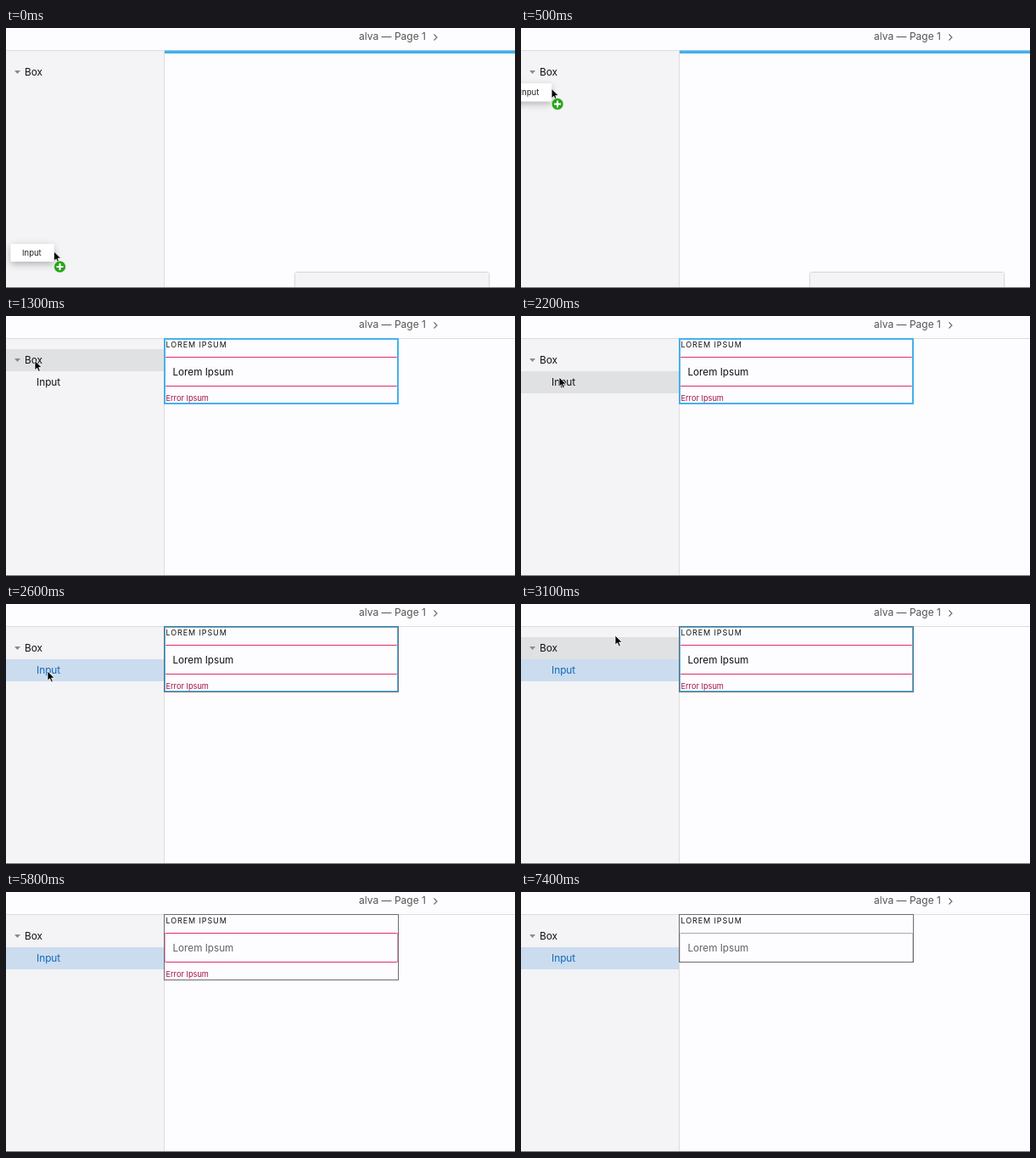
Recreate the animation shown at these times as an HTML page. Size 600x306 px, loop 8 s.

```html
<!DOCTYPE html>
<html lang="en">
<head>
<meta charset="utf-8">
<title>Page editor</title>
<style>
  html, body { margin: 0; width: 100%; height: 100%; overflow: hidden; background: #fdfcfe; }
  svg { display: block; width: 100%; height: 100%; }
  text { font-family: Inter, Roboto, sans-serif; }
  .row { font-size: 11.8px; }
</style>
</head>
<body>
<svg viewBox="0 0 600 306">
  <defs>
    <filter id="soft" x="-50%" y="-100%" width="200%" height="300%">
      <feDropShadow dx="0" dy="3" stdDeviation="4" flood-opacity=".28"/>
    </filter>
    <filter id="edge" x="-10%" y="-30%" width="120%" height="160%">
      <feDropShadow dx="0" dy="0" stdDeviation="1.2" flood-opacity=".4"/>
    </filter>
  </defs>

  <rect width="600" height="306" fill="#fdfcfe"/>
  <rect y="26" width="186" height="280" fill="#f4f3f6"/>
  <path d="M0 26.5H600M186.5 27V306" stroke="#dddcdf"/>
  <text x="416" y="14.2" font-size="12" fill="#555">alva — Page 1</text>
  <path d="M504.5 7.5l3.5 3.5-3.5 3.5" fill="none" stroke="#666" stroke-width="1.1"/>

  <rect id="hover" width="186" height="26" fill="#dfe1e3"/>
  <rect id="picked" y="65" width="186" height="26" fill="#cbdcef"/>
  <path d="M10 50h7l-3.5 4z" fill="#8a8a8c"/>
  <text class="row" x="22" y="56" fill="#111">Box</text>
  <text class="row" id="child" x="36" y="82">Input</text>

  <rect id="bar" x="187" y="26.5" width="413" height="3.5" fill="#42b0ea"/>
  <rect id="panel" x="341" y="288" width="228" height="30" rx="1" fill="#f4f3f5" filter="url(#edge)"/>

  <g id="field">
    <text x="188.5" y="37.3" font-size="9" letter-spacing=".9" fill="#111">LOREM IPSUM</text>
    <text id="value" x="196.5" y="70.2" font-size="11.7">Lorem Ipsum</text>
    <rect id="input" x="187" y="48.5" width="275" height="34" rx="1.5" fill="none"/>
    <text id="error" x="188.5" y="100.2" font-size="9.2" fill="#a3104a">Error Ipsum</text>
    <rect id="glow" x="187" y="27" width="275" height="76" fill="none" stroke="#46b1ec" stroke-width="2"/>
    <rect id="frame" x="186.5" y="26.5" width="276" fill="none" stroke="#6d6d70"/>
  </g>

  <g id="ghost">
    <rect x="-51" y="-10.5" width="51" height="21" rx="2" fill="#fff" filter="url(#soft)"/>
    <text x="-37.5" y="3.4" font-size="9.5" fill="#222">Input</text>
  </g>
  <g id="cursor">
    <path d="M0 0V11.2L2.6 8.8 4.4 12.8 6.3 12 4.6 8.1H8.2Z" fill="#000" stroke="#fff" stroke-width=".8"/>
    <g id="badge" transform="translate(7 18)">
      <circle r="7" fill="#2aa31c" stroke="#e8f3e6" stroke-width=".8"/>
      <path d="M-4 0H4M0-4V4" stroke="#fff" stroke-width="2"/>
    </g>
  </g>

  <path d="M0 305.5H600" stroke="#777"/>
</svg>
<script>
const LOOP = 8000, STEP = 100;
const el = Object.fromEntries([...document.querySelectorAll('svg [id]')].map(e => [e.id, e]));
const show = (e, on) => e.setAttribute('display', on ? 'inline' : 'none');
const place = (e, x, y) => e.setAttribute('transform', `translate(${x.toFixed(2)} ${y.toFixed(2)})`);
const set = (e, key, v) => e.setAttribute(key, v);
const mix = (a, b, k) => a + (b - a) * k;
const out = (t, start, length) => 1 - (1 - Math.min(1, Math.max(0, (t - start) / length))) ** 1.92;

function pointer(t) {
  if (t < 2100) {
    const k = out(t, 0, 700);
    return [mix(56.5, 34, k), mix(263, 52.5, k)];
  }
  if (t < 3100) {
    const k = out(t, 2000, 400);
    return [mix(34, 49, k), mix(52.5, 79, k)];
  }
  return t < 3200 ? [111, 37] : [580, 20];
}

function draw(t) {
  const [x, y] = pointer(t);
  const filled = t >= 1200, selected = t >= 2600, invalid = t < 7400;
  const onBox = (t >= 600 && t < 2200) || (t >= 3100 && t < 3200);
  const onChild = t >= 2200 && t < 2600;

  place(el.cursor, x, y);
  show(el.cursor, t < 3300);
  show(el.badge, t < 1000);
  place(el.ghost, x, mix(264.5, 57, out(t, 0, 700)));
  show(el.ghost, t < 1000);

  set(el.hover, 'y', onBox ? 39 : 65);
  show(el.hover, onBox || onChild);
  show(el.picked, selected);
  show(el.child, filled);
  set(el.child, 'fill', selected ? '#0d69b8' : '#111');

  show(el.bar, t < 600);
  show(el.panel, !filled);
  show(el.field, filled);
  set(el.value, 'fill', t < 5800 ? '#111' : '#626266');
  set(el.input, 'stroke', invalid ? '#dd2e72' : '#a9a9ac');
  show(el.error, invalid);
  show(el.glow, t < 3200);
  show(el.frame, selected);
  set(el.frame, 'height', invalid ? 77 : 56);
}

function tick(now) {
  draw(Math.floor(now % LOOP / STEP) * STEP);
  requestAnimationFrame(tick);
}
draw(0);
requestAnimationFrame(tick);
</script>
</body>
</html>
```
